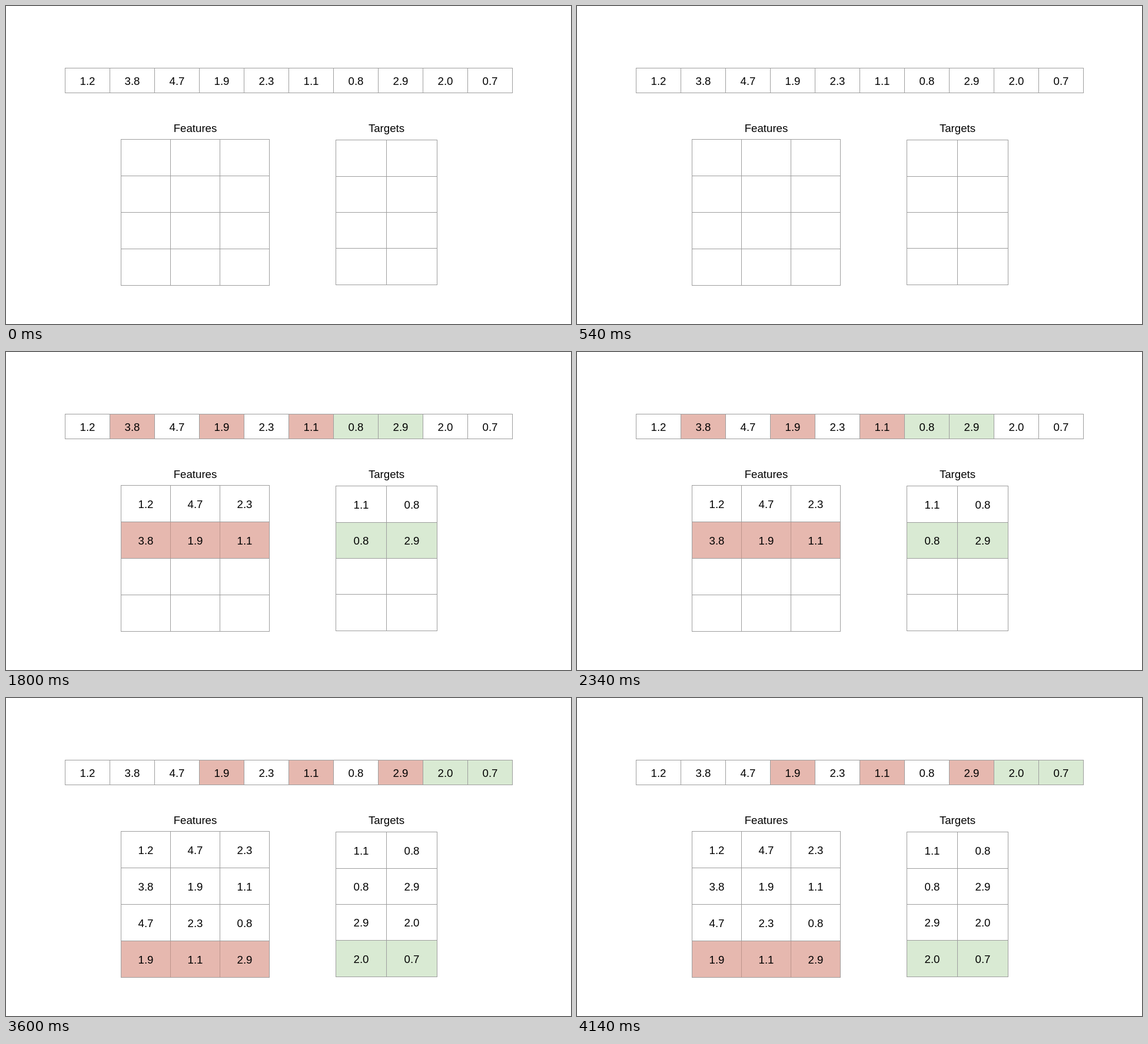
These frames come from a looping animation (960x540 px, 4500 ms). An HTML page:

```html
<!DOCTYPE html>
<html lang="en">
<head>
<meta charset="utf-8">
<title>Sliding window</title>
<style>
  html, body { margin: 0; width: 100%; height: 100%; overflow: hidden; background: #fff; }
  svg { display: block; width: 960px; height: 540px; }
  text { font: 18.667px "Liberation Sans", Arial, sans-serif; text-anchor: middle; fill: #000; }
  .grid { stroke: #9e9e9e; fill: none; }
  .inner { stroke: #bd958c; fill: none; }
</style>
</head>
<body>
<svg id="stage" viewBox="0 0 960 540"></svg>
<script>
const STEP = 900, STEPS = 5;
const RED = '#e6b8af', GREEN = '#d9ead3';
const series = ['1.2', '3.8', '4.7', '1.9', '2.3', '1.1', '0.8', '2.9', '2.0', '0.7'];
const featureAt = [0, 2, 4], targetAt = [5, 6];
const stage = document.getElementById('stage');

function add(tag, attrs, text = '') {
  const el = document.createElementNS('http://www.w3.org/2000/svg', tag);
  for (const key in attrs) el.setAttribute(key, attrs[key]);
  el.textContent = text;
  return stage.appendChild(el);
}

const edges = (from, size, count) => Array.from({ length: count + 1 }, (_, i) => from + size * i);

// Draws a table and returns its cells by row and column.
function table(xs, ys) {
  const left = xs[0], right = xs[xs.length - 1];
  const top = ys[0], bottom = ys[ys.length - 1];
  const rows = ys.slice(1).map((y1, r) => xs.slice(1).map((x1, c) => {
    const x = xs[c], y = ys[r];
    return {
      box: add('rect', { x, y, width: x1 - x, height: y1 - y, fill: '#fff' }),
      label: add('text', { x: (x + x1) / 2, y: Math.round((y + y1) / 2 + 7.2) })
    };
  }));
  const d = xs.map(x => `M${x} ${top - .5}V${bottom + .5}`).join('') +
            ys.map(y => `M${left - .5} ${y}H${right + .5}`).join('');
  add('path', { d, class: 'grid' });
  return rows;
}

const strip = table(edges(100.5, 76, 10), [105.5, 147.5])[0];
const featureXs = edges(195.5, 84, 3), featureYs = edges(226.5, 62, 4);
const features = table(featureXs, featureYs);
const targets = table(edges(560.5, 86, 2), [227.5, 289.5, 350.5, 411.5, 473.5]);
const dividers = featureYs.slice(0, -1).map(y => add('path', {
  d: featureXs.slice(1, -1).map(x => `M${x} ${y + .5}v61`).join(''), class: 'inner'
}));

add('text', { x: 321.5, y: 214 }, 'Features');
add('text', { x: 646.5, y: 214 }, 'Targets');
strip.forEach((cell, i) => cell.label.textContent = series[i]);

function fillRows(rows, offsets, color, active) {
  rows.forEach((row, r) => row.forEach((cell, c) => {
    const i = offsets[c] + r;
    cell.label.textContent = r <= active ? series[i] : '';
    cell.box.setAttribute('fill', r === active ? color : '#fff');
    if (r === active) strip[i].box.setAttribute('fill', color);
  }));
}

function show(step) {
  const active = step - 1;
  strip.forEach(cell => cell.box.setAttribute('fill', '#fff'));
  fillRows(features, featureAt, RED, active);
  fillRows(targets, targetAt, GREEN, active);
  dividers.forEach((line, r) => line.setAttribute('visibility', r === active ? 'visible' : 'hidden'));
}

const start = performance.now();
let shown = -1;
function tick() {
  const step = Math.floor((performance.now() - start) / STEP) % STEPS;
  if (step !== shown) show(shown = step);
  requestAnimationFrame(tick);
}
tick();
</script>
</body>
</html>
```
